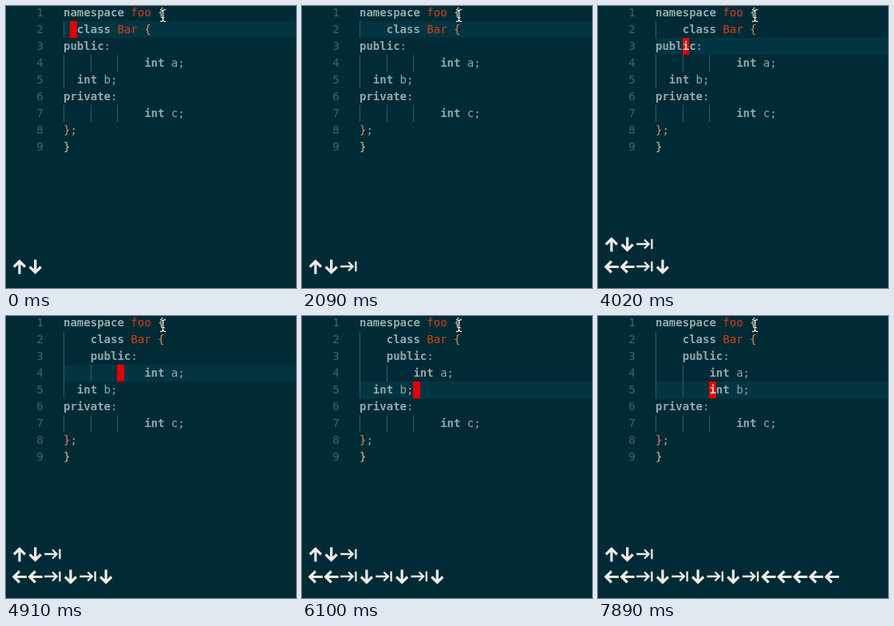
These frames come from a looping animation (363x353 px, 8 s). An HTML page with a canvas:

```html
<!DOCTYPE html>
<html lang="en">
<head>
<meta charset="utf-8">
<title>Indentation in an editor</title>
<style>
  html, body { margin: 0; width: 100%; height: 100%; overflow: hidden; background: #002b36; }
  canvas { display: block; width: 363px; height: 353px; }
</style>
</head>
<body>
<canvas id="stage"></canvas>
<script>
const W = 363, H = 353, LOOP = 8000;
const LEFT = 72, CELL = 8.428, ROW = 21;
const FONT = '14px "DejaVu Sans Mono", monospace';
const color = {
  bg: '#002b36', line: '#023541', number: '#48626a', guide: '#365860',
  text: '#93a8a9', name: '#cf4011', outer: '#d5cc9a', inner: '#d08b55',
  cursor: '#e60000', under: '#c8d2d0', key: '#f1ece6'
};

const lines = [
  'namespace foo {', 'class Bar {', 'public:', 'int a;', 'int b;',
  'private:', 'int c;', '};', '}'
];
const startIndent = [0, 2, 0, 12, 2, 0, 12, 0, 0];
const tabIndent = { 2: 4, 3: 4, 4: 8, 5: 8 };

// time, key pressed (T tab, U/D/L arrows), row, column (-1: blinked off)
const steps = [
  [0, '', 2, 1], [300, '', 2, -1], [590, 'T', 2, 4],
  [1040, '', 2, -1], [1640, '', 2, 4], [2090, '', 2, -1],
  [2540, 'L', 2, 3], [2830, 'L', 2, 2], [3130, 'T', 2, 4], [3730, '', 2, -1],
  [4020, 'D', 3, 4], [4470, 'T', 3, 8],
  [4910, 'D', 4, 8], [5360, '', 4, -1], [5510, 'T', 4, 8], [5950, '', 4, -1],
  [6100, 'D', 5, 8], [6700, 'T', 5, 14], [7150, 'L', 5, 13], [7300, 'L', 5, 13],
  [7450, 'L', 5, 11], [7590, 'L', 5, 10], [7740, 'L', 5, 9], [7890, '', 5, 8]
];

const arrow = new Path2D('M9 0H-7M0 -7L-7 0L0 7');
const tab = new Path2D('M1.5 0H17M11.5 -5.5L17 0L11.5 5.5M20.8 -6.3V6.3');
const turn = { L: 0, U: Math.PI / 2, D: -Math.PI / 2 };

const canvas = document.getElementById('stage');
const ctx = canvas.getContext('2d');
const scale = window.devicePixelRatio || 1;
canvas.width = W * scale;
canvas.height = H * scale;

const colX = c => LEFT + c * CELL;
const rowY = r => ROW * r - 23;

function fill(c, x, y, w, h) {
  ctx.fillStyle = c;
  ctx.fillRect(x, y, w, h);
}

function glyph(ch, x, y, c, bold) {
  ctx.font = (bold ? 'bold ' : '') + FONT;
  ctx.fillStyle = c;
  ctx.fillText(ch, x, y + 15);
}

function stateAt(t) {
  const indent = startIndent.slice();
  const keys = ['UD'];
  let row, col;
  for (const [at, key, r, c] of steps) {
    if (at > t) break;
    row = r;
    col = c;
    if (key === 'T') indent[r - 1] = tabIndent[r];
    if (at === 2540) keys.push('');
    keys[keys.length - 1] += key;
  }
  return { indent, keys, row, col };
}

function tokenColor(word, row) {
  if (/foo|Bar/.test(word)) return color.name;
  if (/[{}]/.test(word)) return row === 2 || row === 8 ? color.inner : color.outer;
  return color.text;
}

function drawLine(row, indent, cursor) {
  const y = rowY(row);
  glyph(String(row), colX(-4), y, color.number);
  for (let c = 0; c < indent; c += 4) fill(color.guide, Math.round(colX(c)), y, 1, ROW);
  if (cursor >= 0) {
    const x = Math.round(colX(cursor));
    fill(color.cursor, x, y, Math.round(colX(cursor + 1)) - x, ROW);
  }
  for (const m of lines[row - 1].matchAll(/\w+|[^\w\s]/g)) {
    const bold = /^(namespace|class|public|private|int)$/.test(m[0]);
    const tint = tokenColor(m[0], row);
    [...m[0]].forEach((ch, i) => {
      const c = indent + m.index + i;
      glyph(ch, colX(c), y, c === cursor ? color.under : tint, bold);
    });
  }
}

function drawKeys(keys, y) {
  let x = 7;
  ctx.strokeStyle = color.key;
  for (const k of keys) {
    ctx.save();
    if (k === 'T') {
      ctx.translate(x, y - 0.5);
      ctx.lineWidth = 2.3;
      ctx.stroke(tab);
      x += 24.4;
    } else {
      ctx.translate(x + 9.9, y);
      ctx.rotate(turn[k]);
      ctx.lineWidth = 3.2;
      ctx.stroke(arrow);
      x += 19.8;
    }
    ctx.restore();
  }
}

const beam = new Path2D('M193 4.5Q196 4.5 196.5 6.5Q197 4.5 200 4.5M196.5 6V18M193 19.5Q196 19.5 196.5 17.5Q197 19.5 200 19.5M194.5 14.5H198.5');
function drawPointer() {
  for (const [c, w] of [['#12343c', 2.6], ['#f4f4f0', 1.2]]) {
    ctx.strokeStyle = c;
    ctx.lineWidth = w;
    ctx.stroke(beam);
  }
}

function draw() {
  const s = stateAt(performance.now() % LOOP);
  ctx.setTransform(scale, 0, 0, scale, 0, 0);
  fill(color.bg, 0, 0, W, H);
  fill(color.line, LEFT, rowY(s.row), W - LEFT, ROW);
  lines.forEach((_, i) => drawLine(i + 1, s.indent[i], s.row === i + 1 ? s.col : -1));
  s.keys.forEach((k, i) => drawKeys(k, 326.5 - 28 * (s.keys.length - 1 - i)));
  drawPointer();
  requestAnimationFrame(draw);
}
draw();
</script>
</body>
</html>
```
